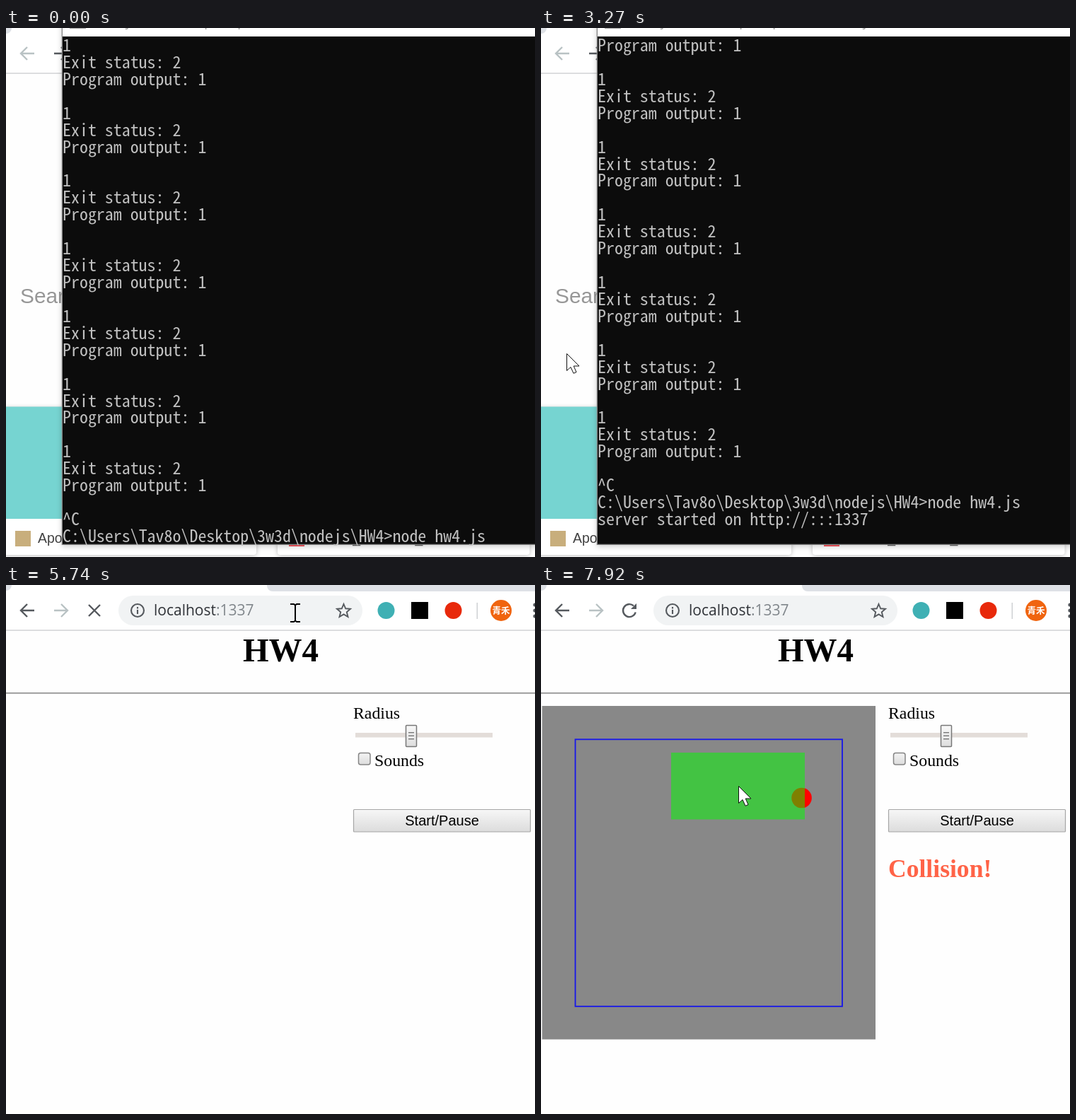
These frames come from a looping animation (748x748 px, 7.99 s). An HTML page with a canvas:

```html
<!DOCTYPE html>
<html lang="en">
<head>
<meta charset="utf-8">
<title>Node server demo</title>
<style>
html, body { margin: 0; height: 100%; overflow: hidden; background: #fefefe; }
canvas { display: block; width: 748px; height: 748px; }
</style>
</head>
<body>
<canvas id="stage" width="748" height="748"></canvas>
<script>
const g = document.getElementById('stage').getContext('2d');
const LOOP = 7990;
const SANS = '"Liberation Sans", "Noto Sans CJK TC", sans-serif';
const SANS_SC = '"Liberation Sans", "Noto Sans CJK SC Light", "Noto Sans CJK SC", sans-serif';
const SERIF = '"Liberation Serif", serif';
const UI = '"Open Sans", sans-serif';
const TEAL = '#76d4d1', DARK = '#55595e', PALE = '#b9c2c4';
const ROW = 23.93;

// Half-width CJK mono fits the 12px cell; otherwise use a smaller mono.
let mono = ROW + 'px "Noto Sans Mono CJK TC", "Noto Sans Mono CJK JP", monospace';
g.font = mono;
if (g.measureText('0').width > 12.3) mono = '20px "Liberation Mono", monospace';

const block = ['1', 'Exit status: 2', 'Program output: 1', ''];
const lines = [
  ...Array(7).fill(block).flat(),
  '^C',
  'C:\\Users\\Tav8o\\Desktop\\3w3d\\nodejs\\HW4>node hw4.js',
  'server started on http://:::1337'
];

// Pointer moves: start, end, then from, control and to points.
const moves = [
  [210, 470, 760, 600, 680, 540, 600, 503.5],
  [2330, 3110, 600, 503.5, 250, 168, 36, 460],
  [3710, 4510, 36, 460, 190, 180, 409, 39],
  [5840, 6680, 409, 39, 480, 80, 490, 190],
  [6920, 7530, 490, 190, 130, 300, 279, 284]
];

function rect(x, y, w, h, color) {
  g.fillStyle = color;
  g.fillRect(x, y, w, h);
}

function round(x, y, w, h, r, fill, stroke, width = 1) {
  g.beginPath();
  g.roundRect(x, y, w, h, r);
  if (fill) { g.fillStyle = fill; g.fill(); }
  if (stroke) { g.strokeStyle = stroke; g.lineWidth = width; g.stroke(); }
}

function disc(x, y, r, color) {
  g.beginPath();
  g.arc(x, y, r, 0, 7);
  g.fillStyle = color;
  g.fill();
}

function text(s, x, y, font, color, align = 'left') {
  g.font = font;
  g.fillStyle = color;
  g.textAlign = align;
  g.fillText(s, x, y);
}

function shape(d, x, y, fill, stroke, width = 2.4) {
  const p = new Path2D(d);
  g.save();
  g.translate(x, y);
  if (fill) { g.fillStyle = fill; g.fill(p); }
  if (stroke) { g.strokeStyle = stroke; g.lineWidth = width; g.stroke(p); }
  g.restore();
}

function toolbar(t) {
  const loaded = t >= 5520, focus = t >= 4590 && !loaded, selected = t >= 4690 && !loaded;
  rect(0, 0, 748, 64, '#fff');
  round(-20, -20, 28, 28, 8, '#dee1e6');
  round(369, -20, 400, 29, 8, '#dee1e6');
  rect(0, 63.3, 748, 1.5, '#d2d3d5');

  shape('M10 0H-8M0 -9L-9 0L0 9', 30, 36, null, loaded ? DARK : PALE);
  shape('M-10 0H8M0 -9L9 0L0 9', 78, 36, null, loaded ? PALE : DARK);
  if (loaded && t < 5910) {
    shape('M-8 -8L8 8M8 -8L-8 8', 125, 36, null, DARK);
  } else {
    shape('M8.7 2.5A9 9 0 1 1 6 -6.6', 125, 36, null, DARK);
    shape('M10 -10V-2H2Z', 125, 36, DARK);
  }

  if (focus) round(158.5, 14.5, 346, 43, 21.5, '#fff', '#aecbfa', 3);
  else round(159, 15, 345, 42, 21, '#f1f3f4');
  if (loaded) {
    shape('M-9 0A9 9 0 1 0 9 0A9 9 0 1 0 -9 0M0 -1V5M0 -5V-2.6', 186, 36, null, DARK, 2.1);
    shape('M0 -9.5L2.7 -3.2L9.5 -2.7L4.3 1.8L6 8.5L0 4.9L-6 8.5L-4.3 1.8L-9.5 -2.7L-2.7 -3.2Z',
      477.5, 36.5, null, DARK, 1.9);
  } else {
    disc(186, 36, 10, '#5c6070');
    shape('M-7 -2L-1 1L-1 4L1 7L-3 7Q-8 4 -7 -2ZM0 -8L5 -6L3 -3L-1 -1L-3 -4ZM3 1L8 1L5 6L3 4Z',
      186, 36, '#f1f3f4');
  }
  const host = loaded ? 'localhost' : 'Localhost';
  if (selected) rect(209, 21, 149, 30, '#0078d7');
  text(host, 209, 43, '21px ' + UI, selected ? '#fff' : '#303338');
  text(':1337', 209 + g.measureText(host).width, 43, '21px ' + UI, selected ? '#fff' : '#80868b');

  disc(537.5, 36, 12, '#3fb0b4');
  rect(573, 24, 24, 24, loaded ? '#000' : '#25262a');
  disc(632.5, 36, 12, '#e8290b');
  rect(665.5, 25, 1.5, 23, '#cfd1d4');
  disc(700, 36, 15, '#f0640f');
  text('青禾', 700, 40.5, 'bold 12.5px ' + SANS, '#fff', 'center');
  for (const y of [28, 36, 44]) disc(748, y, 2.6, DARK);
}

function card(x, w, color, letter, font, baseline) {
  g.save();
  g.shadowColor = 'rgba(0,0,0,.25)';
  g.shadowBlur = 6;
  g.shadowOffsetY = 1;
  round(x, 536, w, 209, 4, '#fff');
  g.restore();
  round(x, 535.5, w, 158.5, [4, 4, 0, 0], color);
  text(letter, x + w / 2, baseline, font, 'rgba(255,255,255,.6)', 'center');
}

function startPage() {
  disc(369, 219, 28, '#36aabb');
  text('Search the web to plant trees...', 20, 388.5, '29.85px ' + SANS, '#979797');
  shape('M-13 0A13 13 0 1 0 13 0A13 13 0 1 0 -13 0', 703, 374, null, '#979797', 4.5);
  shape('M9 10L20 21', 703, 374, null, '#979797', 6);
  card(-4, 358, TEAL, 'A', '55px ' + SANS, 641);
  card(384, 356.5, '#ff6c6c', '绘', '300 54px ' + SANS_SC, 645);
  rect(13, 711, 22, 22, '#c8ae7c');
  rect(400, 711, 22, 22, '#f4525a');
  text('Apoku7.me 動畫線上看 …', 45, 728, '19.4px ' + SANS, '#414141');
  text('绘栗亭_在线漫画_为看…', 432, 728, '300 19.4px ' + SANS_SC, '#606060');
}

function scene(t) {
  const clicked = t >= 7760;
  const bx = clicked ? 184 : 142, by = clicked ? 237 : 359.5;
  const s = (t - 5910) / 1000, x = 237 + 65.4 * s, y = 407 - 52.7 * s;
  rect(1.5, 171, 471.5, 471.5, '#888');
  g.strokeStyle = '#1616ea';
  g.lineWidth = 1.8;
  g.strokeRect(48.5, 218.3, 377.5, 377.5);
  disc(x, y, 14.3, '#f00');
  rect(bx, by, 189, 94.5, 'rgba(0,255,0,.5)');

  const dx = x - Math.max(bx, Math.min(x, bx + 189));
  const dy = y - Math.max(by, Math.min(y, by + 94.5));
  if (Math.hypot(dx, dy) < 14.3) text('Collision!', 491, 413, 'bold 35.6px ' + SERIF, '#ff6347');
}

function shade(y, h, top, bottom) {
  const fill = g.createLinearGradient(0, y, 0, y + h);
  fill.addColorStop(0, top);
  fill.addColorStop(1, bottom);
  return fill;
}

function homework(t) {
  text('HW4', 388.5, 108, 'bold 47px ' + SERIF, '#000', 'center');
  rect(0, 152, 748, 1.6, '#8c8c8c');
  text('Radius', 491, 189, '23.8px ' + SERIF, '#000');
  rect(494, 209, 194, 6.5, '#e3ddd9');
  round(565.5, 198.5, 15, 30, 1, shade(198, 30, '#fafafa', '#dedede'), '#777', 1.5);
  for (const y of [208, 212.5, 217]) rect(569, y, 8, 1.4, '#777');
  round(498.5, 237.5, 16.5, 16.5, 3, shade(237, 17, '#f4f4f4', '#dcdcdc'), '#858585', 1.5);
  text('Sounds', 521, 256, '23.8px ' + SERIF, '#000');
  round(491.5, 317.5, 250, 31.5, 1, shade(317, 32, '#f7f7f7', '#dcdcdc'), '#a6a6a6', 1.2);
  text('Start/Pause', 616.5, 339.5, '20px ' + SANS, '#000', 'center');
  if (t >= 5910) scene(t);
}

function terminal(t) {
  const active = t >= 300 && t < 3270, running = t >= 1620;
  g.save();
  g.shadowColor = active ? 'rgba(0,0,0,.25)' : 'rgba(0,0,0,.2)';
  g.shadowBlur = active ? 14 : 8;
  g.shadowOffsetY = 2;
  rect(78.7, -30, 700, 761, active ? '#1a7fd4' : '#858585');
  g.restore();
  rect(80, -1, 680, 13, '#fff');
  rect(80, 12, 680, 717.7, '#0c0c0c');
  rect(90, 0, 23, 1.2, active ? '#777' : '#aaa');
  text('Node.js command prompt' + (running ? ' - node  hw4.js' : ''), 118, -2.5,
    '18.5px ' + UI, active ? '#222' : '#999');

  const scroll = t >= 1930 ? 2 : running ? 1 : 0;
  lines.forEach((line, i) => {
    const row = i - scroll;
    if (row >= 0 && row < 30 && (i < 30 || t >= 1930)) text(line, 80, 33 + row * ROW, mono, '#c0c0c0');
  });
  const caret = t < 1030 ? t >= 300 : t >= 1530 && t < 2490 || t >= 3030 && t < 3270;
  if (caret) rect(running ? 80 : 678, 724, 12, 6, '#f2f2f2');
}

function pointer(t) {
  const m = moves.filter(k => t >= k[0]).pop();
  if (!m) return;
  const [a, b, x0, y0, cx, cy, x1, y1] = m;
  const p = Math.min(1, (t - a) / (b - a)), u = p * p * (3 - 2 * p), v = 1 - u;
  const x = v * v * x0 + 2 * u * v * cx + u * u * x1;
  const y = v * v * y0 + 2 * u * v * cy + u * u * y1;
  if (y < 58 && x > 159 && x < 504) {
    shape('M-7 -12H-2L0 -10.5L2 -12H7M0 -11V12M-7 13H-2L0 11.5L2 13H7', x, y, null, '#000', 2);
  } else {
    shape('M.5 .5V24.5L6 19.5L10 28.3L14 26.6L10.2 18H18Z', x, y, '#fff', '#111', 1);
  }
}

function draw(now) {
  const t = now % LOOP;
  rect(0, 0, 748, 748, '#fefefe');
  toolbar(t);
  if (t < 5600) startPage();
  else if (t >= 5740) homework(t);
  if (t < 3340) terminal(t);
  pointer(t);
  requestAnimationFrame(draw);
}

draw(0);
</script>
</body>
</html>
```
